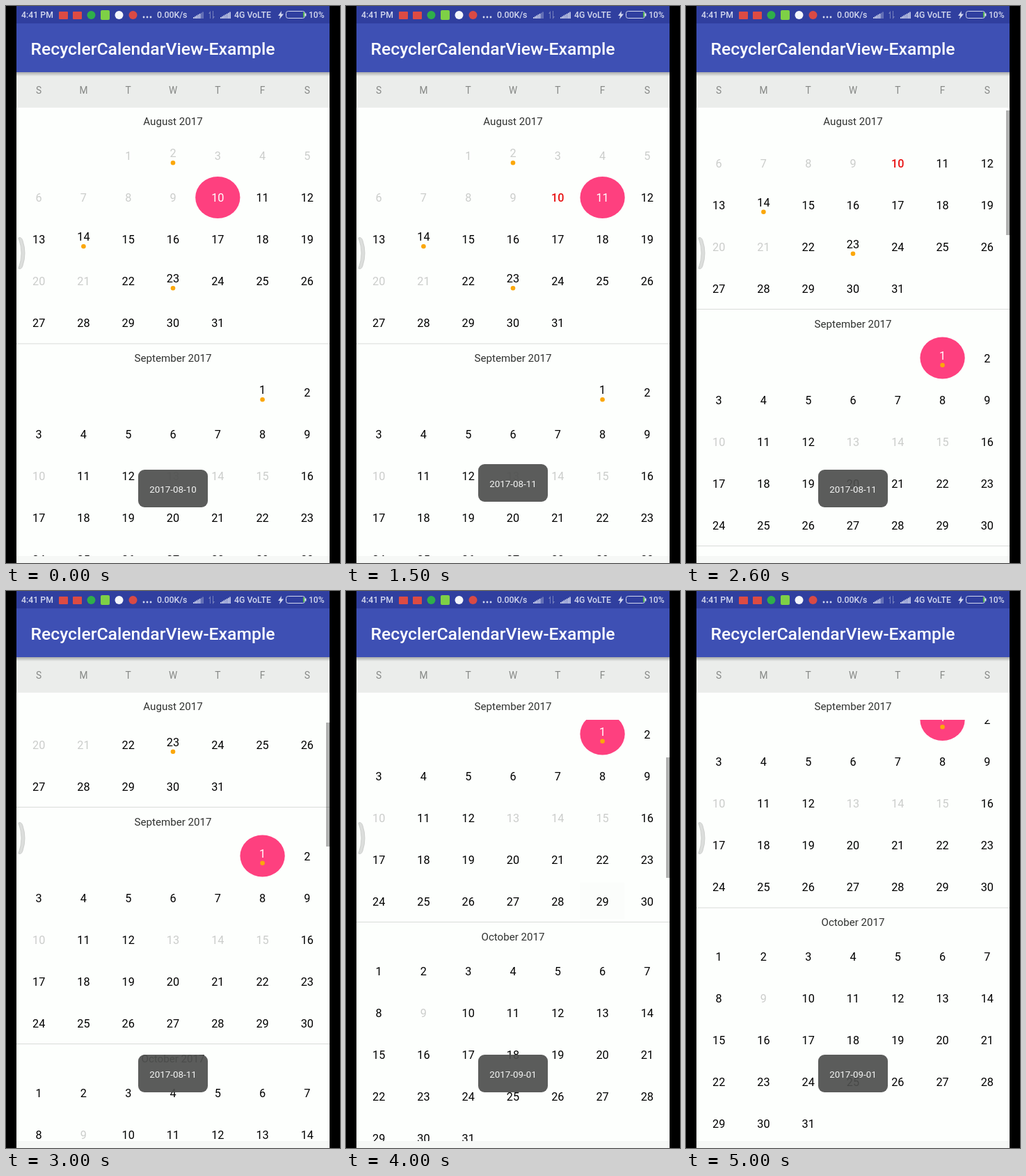
Write an HTML page with a canvas that moves like this. It is 480 px wide and 800 px high and loops after 5.1 s.

```html
<!DOCTYPE html>
<html lang="en">
<head>
<meta charset="utf-8">
<title>Calendar</title>
<style>
  html, body { margin: 0; height: 100%; overflow: hidden; background: #000; }
  canvas { display: block; }
</style>
</head>
<body>
<canvas id="stage" width="480" height="800"></canvas>
<script>
const ctx = document.getElementById('stage').getContext('2d');
const LOOP = 5100, STEP = 100;
const LEFT = 15, WIDTH = 450, CELL = WIDTH / 7;
const TOP = 146, HEADER = 39, BOTTOM = 790;
const ORANGE = '#fba70b', PINK = '#fe407f', PAPER = '#fdfffd';

const months = [
  { name: 'August 2017', id: '2017-08', first: 2, days: 31, off: [1, 2, 3, 4, 5, 6, 7, 8, 9, 20, 21], dots: [2, 14, 23] },
  { name: 'September 2017', id: '2017-09', first: 5, days: 30, off: [10, 13, 14, 15], dots: [1] },
  { name: 'October 2017', id: '2017-10', first: 0, days: 31, off: [9], dots: [] }
];
const BLOCK = 340;

// Tracks are [time, value] pairs.
const scrollTrack = [[2400, 0], [2600, 49.5], [3000, 174.5], [3400, 257], [3600, 267.5],
  [3700, 277], [4000, 349.5], [4200, 367], [4500, 369.5], [4800, 370]];
const barTop = [[0, 135], [49.5, 150], [174.5, 189], [267.5, 217], [349.5, 239], [370, 244]];
const barBottom = [[0, 314], [49.5, 329], [174.5, 367], [267.5, 397], [349.5, 412], [370, 418]];
const barAlpha = [[2400, 0], [2500, 1], [4800, 1], [5000, 0]];
const pressAlpha = [[3500, 0], [3600, 1], [3700, 1], [4000, 0.1], [4100, 0]];
const toasts = [
  { text: '2017-08-10', enter: -1000, exit: 250 },
  { text: '2017-08-11', enter: 1250, exit: 3000 },
  { text: '2017-09-01', enter: 3200, exit: 9000 }
];

function track(points, t) {
  if (t <= points[0][0]) return points[0][1];
  for (let i = 1; i < points.length; i++) {
    const [t0, a] = points[i - 1], [t1, b] = points[i];
    if (t <= t1) return a + (b - a) * (t - t0) / (t1 - t0);
  }
  return points[points.length - 1][1];
}

function rect(x, y, w, h, color) {
  ctx.fillStyle = color;
  ctx.fillRect(x, y, w, h);
}

function round(x, y, w, h, r, color) {
  ctx.fillStyle = color;
  ctx.beginPath();
  ctx.roundRect(x, y, w, h, r);
  ctx.fill();
}

function oval(x, y, rx, ry, color) {
  ctx.fillStyle = color;
  ctx.beginPath();
  ctx.ellipse(x, y, rx, ry, 0, 0, Math.PI * 2);
  ctx.fill();
}

function shape(path, color) {
  ctx.fillStyle = color;
  ctx.fill(new Path2D(path));
}

function text(str, x, y, size, color, align = 'center', weight = 400) {
  ctx.font = `${weight} ${size}px Roboto, sans-serif`;
  ctx.textAlign = align;
  ctx.fillStyle = color;
  ctx.fillText(str, x, y);
}

function clipped(y0, y1, draw) {
  ctx.save();
  ctx.beginPath();
  ctx.rect(LEFT, y0, WIDTH, y1 - y0);
  ctx.clip();
  draw();
  ctx.restore();
}

const columnX = c => LEFT + CELL * (c + 0.5);

function signal(x, bars) {
  for (let i = 0; i < 7; i++) {
    const h = 2 + i * 1.25;
    rect(x + i * 2.2, 18 - h, 1.6, h, i < bars ? '#d3d8ee' : '#7580bd');
  }
}

function drawStatusBar() {
  const ink = '#d3d8ee';
  rect(LEFT, 0, WIDTH, 25, '#303f9f');
  text('4:41 PM', 22, 17, 12.3, ink, 'left', 500);
  round(76, 8, 13, 11, 1, '#dd4b43');
  round(96, 8, 13, 11, 1, '#dd4b43');
  oval(122.5, 13, 6, 6, '#2fae4a');
  round(136, 6, 13, 14, 2, '#7ed046');
  oval(162.5, 13, 6, 6, '#f2f5fc');
  oval(182.5, 13, 6, 6, '#d94a45');
  for (let i = 0; i < 3; i++) oval(198 + i * 5, 16, 1.4, 1.4, ink);
  text('0.00K/s', 217, 17, 12.3, ink, 'left', 500);
  signal(269, 5);
  shape('M293 18V11H291L294 7V18ZM298 7V15H300L297 19V7Z', '#7580bd');
  signal(308, 7);
  text('4G VoLTE', 328, 17, 12.3, ink, 'left', 500);
  shape('M396 7L391 14H394L393 19L399 11.5H395.5Z', ink);
  ctx.strokeStyle = ink;
  ctx.lineWidth = 1;
  ctx.beginPath();
  ctx.roundRect(402.5, 7.5, 27, 10, 3);
  ctx.stroke();
  rect(427, 9, 2, 7, '#58ba55');
  rect(430, 10.5, 1.5, 4, ink);
  text('10%', 435, 17, 12, ink, 'left', 500);
}

function drawAppBar() {
  rect(LEFT, 95, WIDTH, 51, '#ebedeb');
  const shadow = ctx.createLinearGradient(0, 95, 0, 101);
  shadow.addColorStop(0, 'rgba(0,0,0,.28)');
  shadow.addColorStop(1, 'rgba(0,0,0,0)');
  rect(LEFT, 95, WIDTH, 6, shadow);
  rect(LEFT, 25, WIDTH, 70, '#3e50b4');
  text('RecyclerCalendarView-Example', 35.5, 70, 24.75, '#fff', 'left', 500);
  [...'SMTWTFS'].forEach((d, c) => text(d, columnX(c), 125.5, 13.75, '#868886'));
}

function drawDay(month, day, y, selected) {
  const x = columnX((month.first + day - 1) % 7);
  const date = `${month.id}-${String(day).padStart(2, '0')}`;
  const dotted = month.dots.includes(day);
  const today = date === '2017-08-10';
  const chosen = date === selected;
  let color = month.off.includes(day) ? '#cbcdcb' : '#000';
  if (today) color = '#e81313';
  if (chosen) {
    oval(x, y, CELL / 2, 30, PINK);
    color = '#fff';
  }
  text(day, x, y + (dotted ? 2 : 6), 16.25, color, 'center', today && !chosen ? 500 : 400);
  if (dotted) oval(x, y + 10.3, 3.3, 3.3, ORANGE);
}

function drawPress(column, y, alpha) {
  rect(columnX(column) - CELL / 2, y, CELL, 52, `rgba(0,0,0,${0.09 * alpha})`);
}

function drawCalendar(t, scroll) {
  const selected = t < 1000 ? '2017-08-10' : t < 2000 ? '2017-08-11' : '2017-09-01';
  rect(LEFT, TOP, WIDTH, BOTTOM - TOP, PAPER);
  rect(LEFT, BOTTOM, WIDTH, 10, '#f6f8f6');

  clipped(TOP, BOTTOM, () => {
    drawPress(5, 768.5 - scroll, track(pressAlpha, t));
    if (t === 1900) drawPress(5, 529, 1);
    months.forEach((month, m) => {
      const top = TOP + m * BLOCK - scroll;
      if (m) rect(LEFT, top - 1.5, WIDTH, 1, '#dadcda');
      text(month.name, 240, top + 25.2, 15.1, '#2f312f');
      for (let day = 1; day <= month.days; day++) {
        const row = Math.floor((month.first + day - 1) / 7);
        drawDay(month, day, top + 69 + row * 60, selected);
      }
    });
  });

  // The current month's title sticks until the next one pushes it away.
  const current = Math.floor(scroll / BLOCK);
  const nextTop = TOP + (current + 1) * BLOCK - scroll;
  const stickyTop = Math.min(TOP, nextTop - HEADER - 1);
  clipped(TOP, BOTTOM, () => {
    rect(LEFT, stickyTop, WIDTH, HEADER, PAPER);
    text(months[current].name, 240, stickyTop + 25.2, 15.1, '#2f312f');
  });

  const alpha = track(barAlpha, t);
  if (alpha) {
    const y = track(barTop, scroll);
    rect(460, y, 5, track(barBottom, scroll) - y, `rgba(0,0,0,${0.3 * alpha})`);
  }
}

function drawEdgeHandle() {
  ctx.beginPath();
  ctx.moveTo(18, 333);
  ctx.quadraticCurveTo(22, 331, 24, 337);
  ctx.quadraticCurveTo(30, 355, 24, 373);
  ctx.quadraticCurveTo(22, 379, 18, 377);
  ctx.quadraticCurveTo(26, 355, 18, 333);
  ctx.fillStyle = '#dcdedc';
  ctx.fill();
  ctx.strokeStyle = '#c6c8c6';
  ctx.lineWidth = 0.8;
  ctx.stroke();
}

function drawToast({ text: label, enter, exit }, t) {
  const leave = track([[0, 0], [300, 1]], t - exit);
  const alpha = track([[0, 0], [200, 1]], t - enter) * (1 - leave);
  if (alpha <= 0) return;
  const y = 666 + track([[0, 20], [250, -8], [400, 0]], t - enter) + 20 * leave;
  ctx.globalAlpha = alpha;
  round(190, y, 100, 54, 9, 'rgba(78,79,78,.92)');
  text(label, 240, y + 33, 13.4, '#f4f5f4');
  ctx.globalAlpha = 1;
}

function draw(now) {
  const t = Math.floor(now % LOOP / STEP) * STEP;
  rect(0, 0, 480, 800, '#000');
  drawCalendar(t, track(scrollTrack, t));
  drawAppBar();
  drawStatusBar();
  drawEdgeHandle();
  toasts.forEach(toast => drawToast(toast, t));
}

const start = performance.now();
function frame() {
  draw(performance.now() - start);
  requestAnimationFrame(frame);
}
frame();
</script>
</body>
</html>
```
